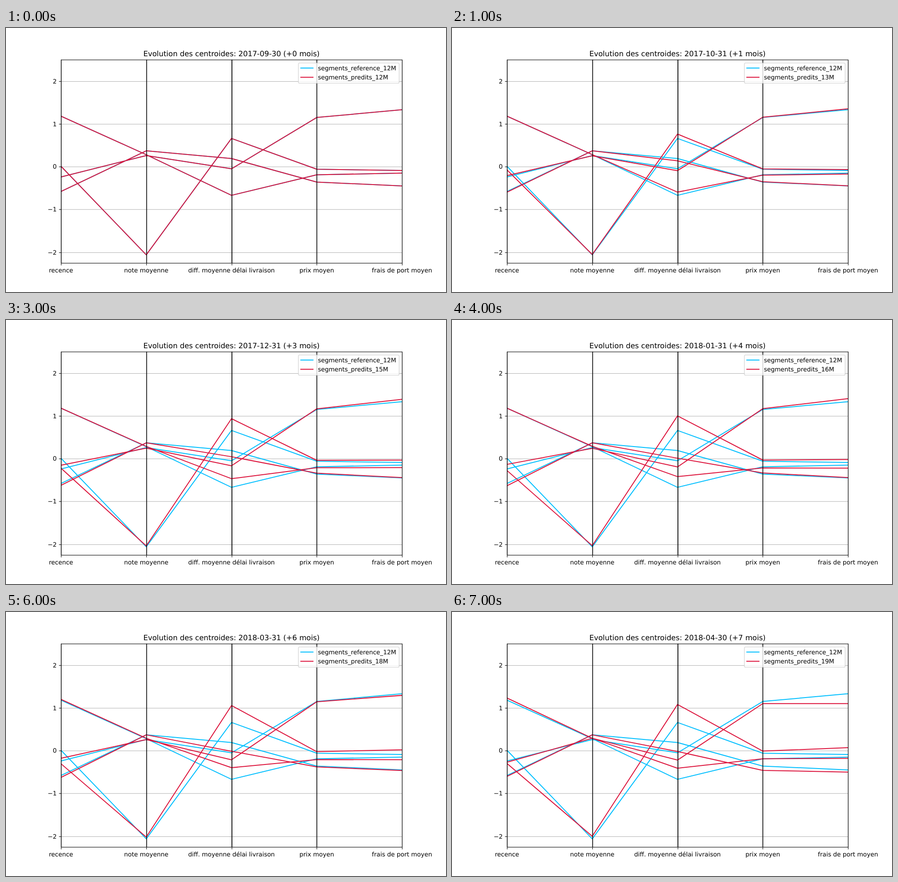
An HTML page that plays this animation: 966x580 px, repeating every 8000 ms.

```html
<!DOCTYPE html>
<html lang="fr">
<head>
<meta charset="utf-8">
<title>Evolution des centroides</title>
<style>
html, body { margin: 0; width: 100%; height: 100%; overflow: hidden; background: #fff; }
svg { display: block; }
text { font: 13.89px "DejaVu Sans", sans-serif; text-rendering: geometricPrecision; white-space: pre; }
#title { font-size: 16.67px; }
.ref { stroke: #00bfff; }
.pred { stroke: #dc143c; }
.ref, .pred { fill: none; stroke-width: 2.08; stroke-linejoin: round; stroke-linecap: square; }
.grid { stroke: #b0b0b0; stroke-width: 1.11; }
.axis { stroke: #000; stroke-width: 1.39; }
.spine { fill: none; stroke: #000; stroke-width: 1.11; }
</style>
</head>
<body>
<svg id="stage" width="966" height="580" viewBox="0 0 1000 600" preserveAspectRatio="none">
  <clipPath id="plot"><rect x="125" y="72" width="775" height="462"/></clipPath>
</svg>
<script>
const STEP = 1000, STEPS = 8;
const LEFT = 125, RIGHT = 900, TOP = 72, BOTTOM = 534;
const LABELS = ["recence", "note moyenne", "diff. moyenne délai livraison", "prix moyen", "frais de port moyen"];

// Three key poses of the four centroids: start, month TURN and month END.
const TURN = 5, END = 7;
const START_POSE = [
  [1.18, 0.28, -0.67, -0.19, -0.15], [0.01, -2.06, 0.66, -0.06, -0.09],
  [-0.24, 0.26, -0.05, 1.15, 1.33], [-0.58, 0.37, 0.19, -0.36, -0.45]];
const TURN_POSE = [
  [1.18, 0.29, -0.39, -0.22, -0.23], [-0.31, -2.03, 1.04, -0.03, -0.01],
  [-0.12, 0.24, -0.21, 1.17, 1.41], [-0.64, 0.37, -0.01, -0.33, -0.44]];
const END_POSE = [
  [1.23, 0.29, -0.41, -0.19, -0.18], [-0.3, -2, 1.08, -0.01, 0.07],
  [-0.27, 0.29, -0.22, 1.1, 1.1], [-0.6, 0.37, -0.02, -0.46, -0.5]];

const xOf = i => LEFT + (RIGHT - LEFT) * i / (LABELS.length - 1);
const yOf = v => TOP + (2.5 - v) * (BOTTOM - TOP) / 4.75;
const snap = p => Math.floor(p + 0.5) + 0.5;
const mix = (a, b, k) => a.map((row, i) => row.map((v, j) => v + (b[i][j] - v) * k));
const pathOf = pose => pose.map(row => "M" + row.map((v, i) => `${xOf(i)},${yOf(v).toFixed(2)}`).join("L")).join("");

// The drift slows down towards the turn, then speeds up again.
function poseAt(month) {
  return month <= TURN
    ? mix(START_POSE, TURN_POSE, 1 - (1 - month / TURN) ** 1.4)
    : mix(TURN_POSE, END_POSE, ((month - TURN) / (END - TURN)) ** 1.4);
}

const stage = document.getElementById("stage");
function add(tag, attrs, parent = stage, content = "") {
  const el = document.createElementNS("http://www.w3.org/2000/svg", tag);
  for (const k in attrs) el.setAttribute(k, attrs[k]);
  el.textContent = content;
  return parent.appendChild(el);
}
const line = (x1, y1, x2, y2, cls, parent) => add("line", { x1, y1, x2, y2, class: cls }, parent);
const label = (x, y, anchor, content) => add("text", { x, y, "text-anchor": anchor }, stage, content);

const plot = add("g", { "clip-path": "url(#plot)" });
const axes = () => LABELS.forEach((_, i) => line(snap(xOf(i)), TOP, snap(xOf(i)), BOTTOM, "axis", plot));

for (let v = -2; v <= 2; v++) {
  const y = snap(yOf(v));
  line(LEFT, y, RIGHT, y, "grid", plot);
  line(120.5, y, 125.5, y, "spine");
  label(115.3, Math.round(yOf(v) + 5), "end", String(v).replace("-", "\u2212"));
}
add("path", { class: "ref", d: pathOf(START_POSE) }, plot);
axes();
const pred = add("path", { class: "pred" }, plot);
axes();

add("rect", { x: snap(LEFT), y: snap(TOP), width: RIGHT - LEFT, height: BOTTOM - TOP, class: "spine" });
LABELS.forEach((name, i) => {
  line(snap(xOf(i)), 534.5, snap(xOf(i)), 539.5, "spine");
  label(xOf(i), 555, "middle", name);
});

add("rect", { x: 664.5, y: 79.5, width: 229, height: 46, rx: 2.78,
  fill: "#fff", stroke: "#ccc", "stroke-width": 1.39, opacity: 0.8 });
function legend(y, cls, content) {
  line(670, y, 697.8, y, cls);
  return label(708.9, y + 5, "start", content);
}
legend(91, "ref", "segments_reference_12M");
const predLabel = legend(112, "pred", "");
const title = label(512.5, 64, "middle", "");
title.id = "title";

let shown = -1;
function draw(now) {
  const month = Math.floor(now / STEP) % STEPS;
  if (month === shown) return;
  shown = month;
  const date = new Date(Date.UTC(2017, 9 + month, 0)).toISOString().slice(0, 10);
  title.textContent = `Evolution des centroides: ${date} (+${month} mois)`;
  predLabel.textContent = `segments_predits_${12 + month}M`;
  pred.setAttribute("d", pathOf(poseAt(month)));
}
const start = performance.now();
function tick() {
  draw(performance.now() - start);
  requestAnimationFrame(tick);
}
tick();
</script>
</body>
</html>
```
